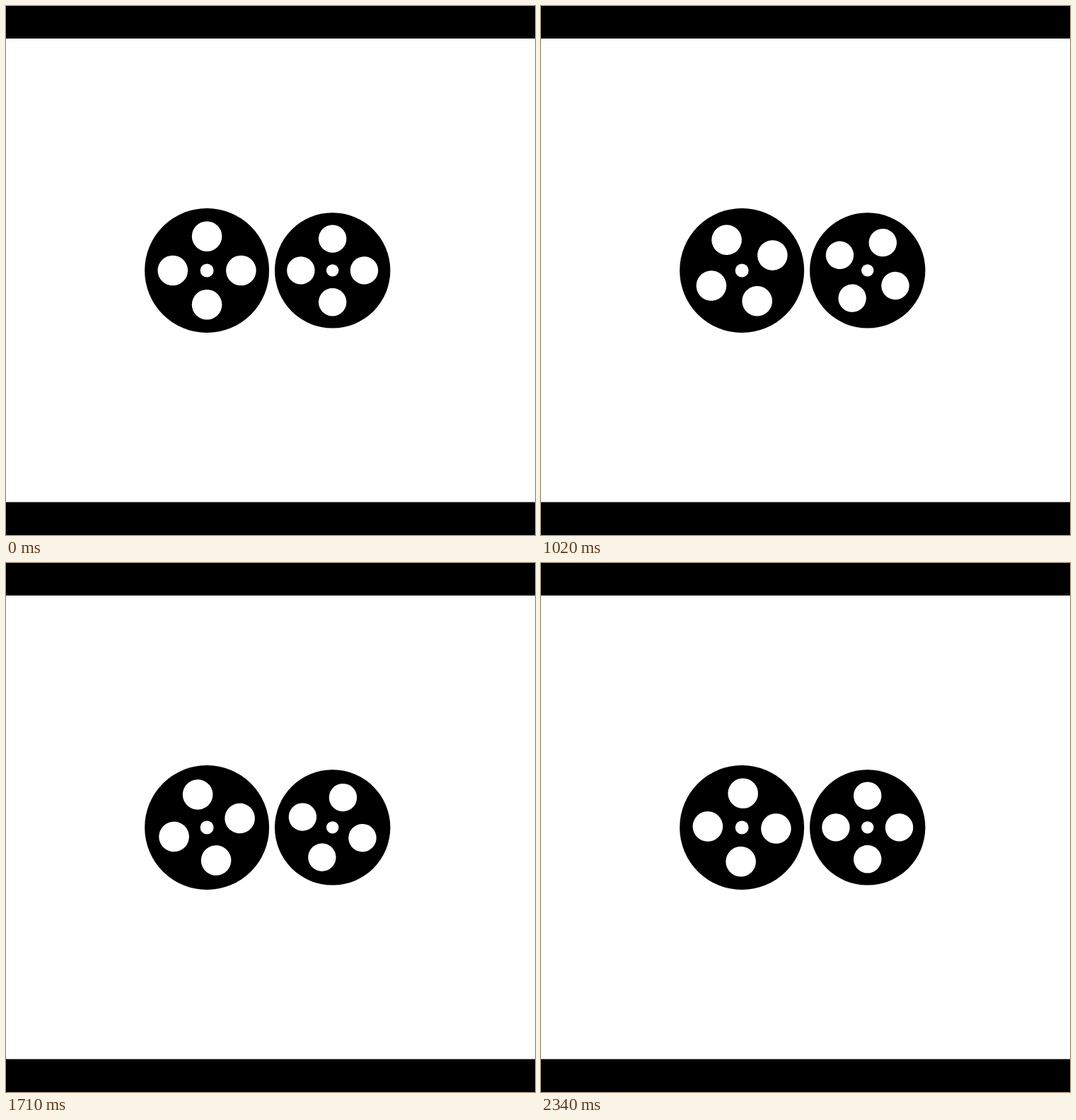
An HTML page for the animation above (2370 ms loop, 748 px wide and 748 px high).

```html
<!DOCTYPE html>
<html lang="en">
<head>
<meta charset="utf-8">
<title>Film reels</title>
<style>
  html, body { margin: 0; width: 100%; height: 100%; overflow: hidden; background: #fff; }
  svg { display: block; width: 100vw; height: 100vh; }
</style>
</head>
<body>
<svg id="stage" viewBox="0 0 748 748">
  <rect width="748" height="748" fill="#fff"/>
  <rect width="748" height="46"/>
  <rect y="701.5" width="748" height="46.5"/>
</svg>
<script>
const LOOP = 2370;
const stage = document.getElementById('stage');

// turn: [step, degrees] pairs, linear in between
const reels = [
  { x: 284.1, y: 374, r: 88, hub: 9.5, hole: 21.3, arm: 48.3,
    turn: [[0, 0], [9, -44], [23, -116.5], [32, -167.1], [38, -195.6], [47, -243.1], [52, -268.2]] },
  { x: 461.7, y: 373.9, r: 81.7, hub: 8.7, hole: 19.7, arm: 44.8,
    turn: [[0, 0], [9, 46.1], [23, 118.8], [32, 169.6], [38, 199.3], [47, 245.6], [52, 270]] }
];

function add(parent, name, attrs) {
  const el = document.createElementNS('http://www.w3.org/2000/svg', name);
  for (const key in attrs) el.setAttribute(key, attrs[key]);
  return parent.appendChild(el);
}

function build(reel) {
  const { x, y, r, hub, hole, arm } = reel;
  const body = add(stage, 'g', { transform: `translate(${x} ${y})` });
  add(body, 'circle', { r });
  add(body, 'circle', { r: hub, fill: '#fff' });
  reel.holes = add(body, 'g', { fill: '#fff' });
  for (const [cx, cy] of [[0, -arm], [arm, 0], [0, arm], [-arm, 0]]) {
    add(reel.holes, 'circle', { cx, cy, r: hole });
  }
}

function valueAt(points, n) {
  let i = 1;
  while (i < points.length - 1 && points[i][0] < n) i++;
  const [n0, a0] = points[i - 1], [n1, a1] = points[i];
  return a0 + (a1 - a0) * (n - n0) / (n1 - n0);
}

// poses are held alternately for 30 and 60 ms
function stepAt(t) {
  return 2 * Math.floor(t / 90) + (t % 90 >= 30 ? 1 : 0);
}

function draw() {
  const n = stepAt(performance.now() % LOOP);
  for (const { holes, turn } of reels) {
    holes.setAttribute('transform', `rotate(${valueAt(turn, n)})`);
  }
  requestAnimationFrame(draw);
}

reels.forEach(build);
draw();
</script>
</body>
</html>
```
